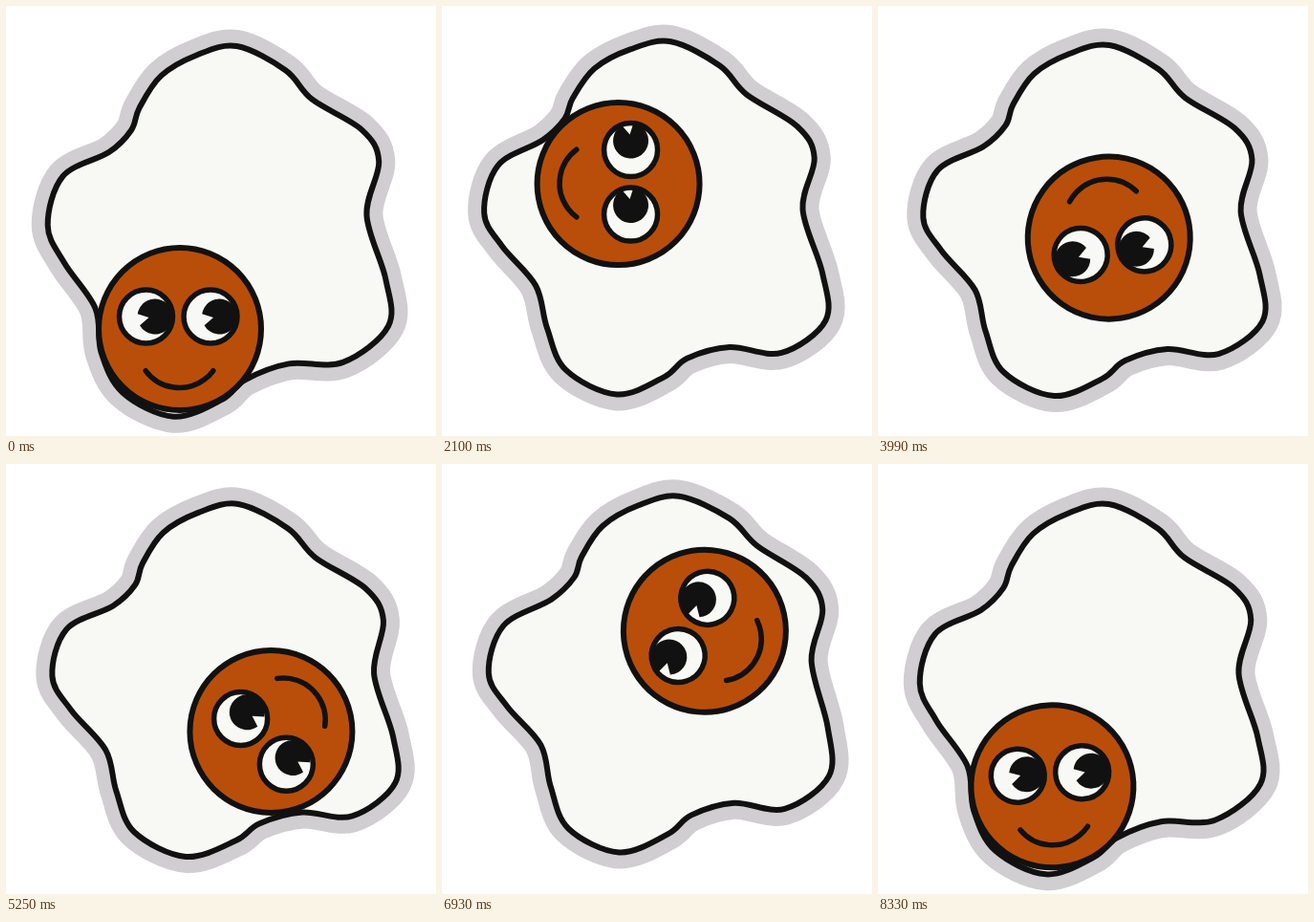
These frames come from a looping animation (450x450 px, 8.4 s). An HTML page with a canvas:

```html
<!DOCTYPE html>
<html>
<head>
<meta charset="utf-8">
<title>Rolling yolk</title>
<style>
html, body { margin: 0; width: 100%; height: 100%; overflow: hidden; background: #fff; }
canvas { display: block; }
</style>
</head>
<body>
<canvas id="stage" width="450" height="450"></canvas>
<script>
const ctx = document.getElementById('stage').getContext('2d');
const LOOP = 8400, STEP = 70, TAU = Math.PI * 2;
const INK = '#111', WHITE = '#f8f9f4', YOLK = '#b94e0a', RIM = '#d0ced0';
const RADIUS = 85, REST = [220, 240], REACH = 170, PULL = 0.0025;

// Resting outline of the egg white, clockwise from the top
const outline = [
  [242, 41], [293, 66], [321, 96], [373, 128], [391, 161], [379, 215], [399, 281], [402, 330],
  [356, 364], [302, 359], [258, 371], [234, 390], [184, 408], [131, 383], [112, 340], [101, 297],
  [66, 256], [47, 221], [62, 172], [110, 147], [133, 125], [141, 103], [163, 71], [200, 50]
];

// Turning points of the yolk: time, x, y
const path = [[0, 182, 338], [2800, 185, 160], [4870, 277, 294], [6650, 281, 164], [LOOP, 182, 338]];

function yolkCentre(t) {
  const i = path.findIndex(key => key[0] > t);
  const [t0, x0, y0] = path[i - 1], [t1, x1, y1] = path[i];
  const u = (1 - Math.cos(Math.PI * (t - t0) / (t1 - t0))) / 2;
  return [x0 + (x1 - x0) * u, y0 + (y1 - y0) * u];
}

// The yolk drags the nearby white along and never leaves it
function deform([x, y], [cx, cy]) {
  const dx = cx - REST[0], dy = cy - REST[1];
  const near = Math.exp(-((Math.hypot(x - cx, y - cy) / REACH) ** 2));
  const pull = PULL * Math.hypot(dx, dy) * near;
  const ox = x + dx * pull - cx, oy = y + dy * pull - cy;
  const push = Math.max(1, (RADIUS + 1) / Math.hypot(ox, oy));
  return [cx + ox * push, cy + oy * push];
}

function eggPath(centre) {
  const pts = outline.map(p => deform(p, centre)), n = pts.length;
  const egg = new Path2D();
  egg.moveTo(...pts[0]);
  for (let i = 0; i < n; i++) {
    const [a, b, c, d] = [n - 1, 0, 1, 2].map(k => pts[(i + k) % n]);
    egg.bezierCurveTo(
      b[0] + (c[0] - a[0]) / 6, b[1] + (c[1] - a[1]) / 6,
      c[0] - (d[0] - b[0]) / 6, c[1] - (d[1] - b[1]) / 6, ...c);
  }
  egg.closePath();
  return egg;
}

function stroke(shape, width, color = INK) {
  ctx.lineWidth = width;
  ctx.strokeStyle = color;
  ctx.stroke(shape);
}

function fill(shape, color) {
  ctx.fillStyle = color;
  ctx.fill(shape);
}

function disc(x, y, r) {
  const p = new Path2D();
  p.arc(x, y, r, 0, TAU);
  return p;
}

function drawEye(x, y, look) {
  const eye = disc(x, y, 28), pupil = new Path2D();
  const px = x + 9.5 * Math.cos(look), py = y + 9.5 * Math.sin(look);
  pupil.arc(px, py, 18.5, Math.PI + 0.15, Math.PI * 3 - 0.53);
  pupil.lineTo(px - 6.5, py + 1);
  fill(eye, WHITE);
  fill(pupil, INK);
  stroke(eye, 5.5);
}

function drawYolk(centre, turn) {
  const face = disc(0, 0, RADIUS), mouth = new Path2D();
  mouth.arc(-0.5, 17.5, 44, Math.PI - 0.64, 0.64, true);
  ctx.save();
  ctx.translate(...centre);
  ctx.rotate(turn);
  fill(face, YOLK);
  stroke(face, 6);
  // The gaze circles twice per turn of the head
  drawEye(-35.5, -13, turn * 2);
  drawEye(32, -13, turn * 2);
  stroke(mouth, 5.5);
  ctx.restore();
}

function draw(t) {
  const centre = yolkCentre(t), egg = eggPath(centre);
  ctx.clearRect(0, 0, 450, 450);
  ctx.lineJoin = ctx.lineCap = 'round';
  stroke(egg, 34, RIM);
  fill(egg, WHITE);
  stroke(egg, 6);
  drawYolk(centre, TAU * t / LOOP);
}

const start = performance.now();
function tick() {
  const t = (performance.now() - start) % LOOP;
  draw(Math.floor(t / STEP) * STEP);
  requestAnimationFrame(tick);
}
tick();
</script>
</body>
</html>
```
